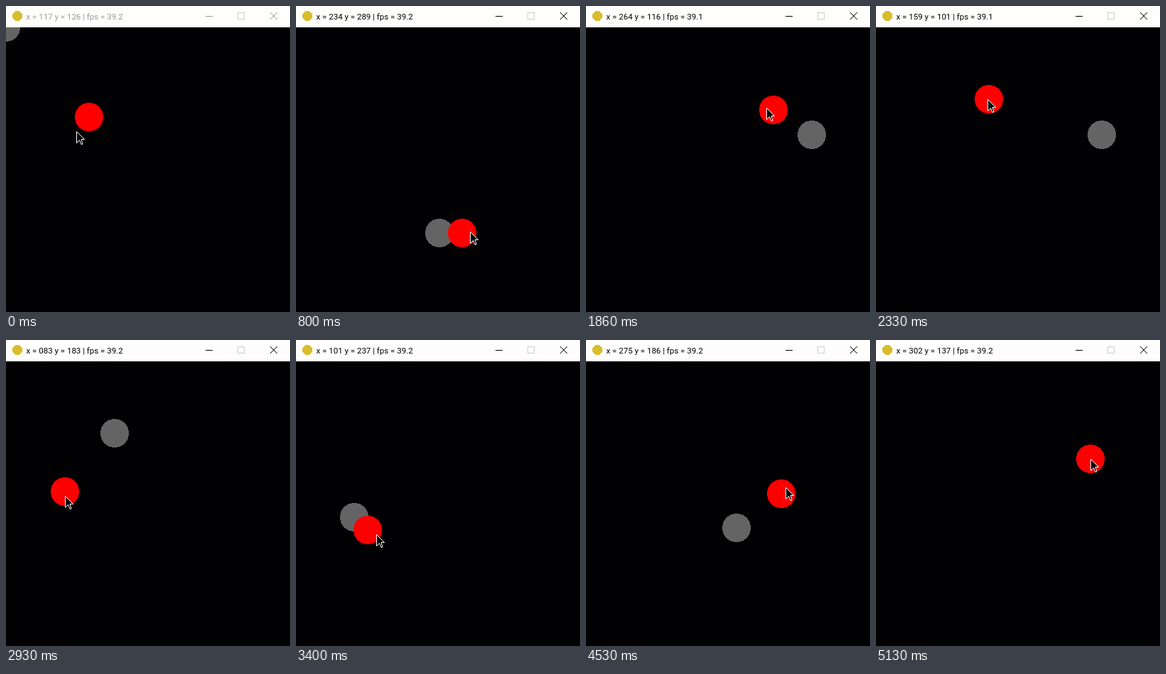
An HTML page with a canvas for the animation above (5.26 s loop, 400 by 430 pixels).

```html
<!DOCTYPE html>
<html lang="en">
<head>
<meta charset="utf-8">
<title>Mouse follower</title>
<style>
html, body { margin: 0; width: 100%; height: 100%; overflow: hidden; background: #000; }
canvas { display: block; }
</style>
</head>
<body>
<canvas id="stage" width="400" height="430"></canvas>
<script>
const ctx = document.getElementById('stage').getContext('2d');
const LOOP = 5260, LAST = 77, BAR = 30, RADIUS = 20;
const CURSOR_LEAD = 0.7; // the disc trails the pointer by part of a step
const CLICK = true;

// Key points of the mouse path: step, x, y, clicked
const path = [
  [0, 117, 156], [1, 95, 184], [5, 92, 280], [10, 202, 319, CLICK],
  [12, 234, 319], [17, 306, 262], [21, 320, 185], [23, 318, 181, CLICK],
  [29, 250, 142], [35, 159, 131], [37, 153, 131, CLICK],
  [44, 83, 213], [49, 82, 249, CLICK],
  [53, 134, 278], [58, 212, 264], [60, 212, 264, CLICK],
  [64, 241, 254], [72, 298, 178], [77, 302, 167, CLICK]
];
const rates = ['39.2', '38.9', '39.1', '39.2', '39.7', '39.2'];

// Slope at key point i; zero where the motion turns, so the curve never overshoots
function slope(i, axis) {
  const rate = j => (path[j + 1][axis] - path[j][axis]) / (path[j + 1][0] - path[j][0]);
  if (i === 0) return rate(0);
  if (i === path.length - 1) return 0;
  const a = rate(i - 1), b = rate(i);
  return a * b > 0 ? 2 * a * b / (a + b) : 0;
}

function mouseAt(step) {
  const s = Math.min(step, LAST);
  const i = Math.max(0, path.findIndex(p => p[0] >= s) - 1);
  const p = path[i], q = path[i + 1];
  const span = q[0] - p[0], u = (s - p[0]) / span, v = 1 - u;
  return [1, 2].map(axis => Math.round(
    v * v * (1 + 2 * u) * p[axis] + u * u * (3 - 2 * u) * q[axis] +
    span * u * v * (v * slope(i, axis) - u * slope(i + 1, axis))));
}

// Hard-edged disc, built from pixel rows
function disc(x, y, r, color) {
  ctx.fillStyle = color;
  for (let row = -r; row < r; row++) {
    const half = Math.round(Math.sqrt(r * r - (row + 0.5) ** 2));
    ctx.fillRect(x - half, y + row, 2 * half, 1);
  }
}

function line(color, ...points) {
  ctx.strokeStyle = color;
  ctx.beginPath();
  points.forEach(p => ctx.lineTo(...p));
  ctx.stroke();
}

function titleBar(step, active) {
  const ink = active ? '#000' : '#999';
  ctx.fillStyle = '#fffefc';
  ctx.fillRect(0, 0, 400, BAR);
  disc(16, 14, 7, '#d9bd2b');

  const [x, y] = mouseAt(step);
  const pad = n => String(n).padStart(3, '0');
  ctx.fillStyle = ink;
  ctx.font = '11.5px Roboto, "Open Sans", sans-serif';
  ctx.fillText(`x = ${pad(x)} y = ${pad(y - BAR)} | fps = ${rates[Math.floor(step / 13)]}`, 28.5, 19);

  ctx.lineWidth = 1;
  line(ink, [281, 14.5], [291, 14.5]);
  ctx.strokeStyle = '#ccc';
  ctx.strokeRect(326.5, 9.5, 9, 9);
  line(ink, [372, 9], [382, 19]);
  line(ink, [382, 9], [372, 19]);
}

function cursor([x, y]) {
  ctx.save();
  ctx.translate(x + 0.5, y + 0.5);
  ctx.lineJoin = 'round';
  ctx.beginPath();
  for (const p of [[0, 0], [0, 16], [4, 12], [6.5, 18], [8.5, 17.5], [6.5, 11], [11, 11]]) ctx.lineTo(...p);
  ctx.closePath();
  ctx.fillStyle = '#000';
  ctx.fill();
  ctx.strokeStyle = '#fff';
  ctx.stroke();
  ctx.restore();
}

function draw(time) {
  // 15 steps per second, on a 10 ms clock
  const tick = Math.floor(time % LOOP / 10);
  const step = Math.min(LAST, Math.ceil(3 * (tick + 1) / 20) - 1);
  const click = path.filter(p => p[3] && p[0] <= step).pop();
  const [, markX, markY] = click || [0, 0, BAR];

  ctx.fillStyle = '#010103';
  ctx.fillRect(0, 0, 400, 426);
  ctx.fillStyle = '#000';
  ctx.fillRect(0, 426, 400, 4);
  disc(markX, markY, RADIUS, '#646464');
  disc(...mouseAt(step), RADIUS, '#f00');
  titleBar(step, Boolean(click));
  cursor(mouseAt(step + CURSOR_LEAD));
}

const start = performance.now();
function loop() {
  draw(performance.now() - start);
  requestAnimationFrame(loop);
}
loop();
</script>
</body>
</html>
```
